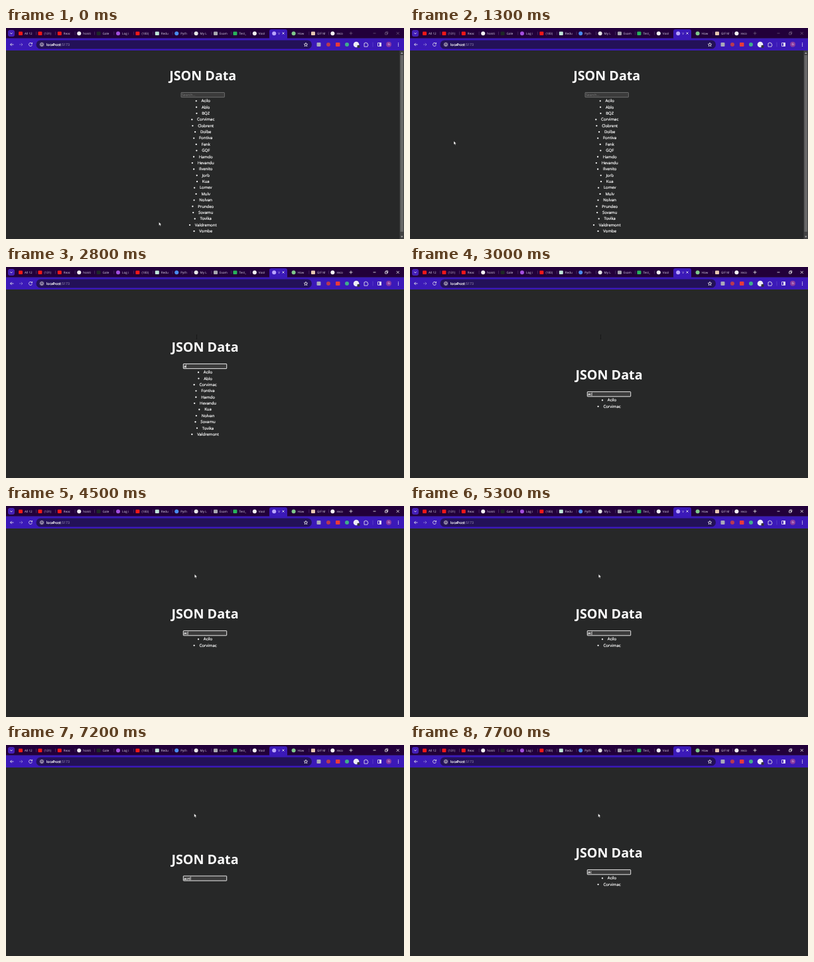
An HTML page that plays this animation: 600 px wide and 319 px high, repeating every 8000 ms.

```html
<!DOCTYPE html>
<html lang="en">
<head>
<meta charset="utf-8">
<title>JSON Data</title>
<style>
html, body { margin: 0; width: 100%; height: 100%; overflow: hidden; background: #272828; }
svg { display: block; width: 600px; height: 319px; font-family: "Open Sans", "Noto Sans", sans-serif; fill: #fff; text-rendering: geometricPrecision; }
.line { fill: none; stroke: #eee; stroke-width: .8; }
.tab { font-size: 4.6px; fill: #ddd6ea; }
.item { font-size: 6px; text-anchor: middle; }
.field { font-size: 5.3px; }
.strong { stroke: #fff; stroke-width: .18; }
</style>
</head>
<body>
<svg viewBox="0 0 600 319">
  <rect width="600" height="319" fill="#272828"/>
  <g id="chrome"></g>
  <g id="page"></g>
  <g id="mouse"></g>
</svg>
<script>
const LOOP = 8000, ROW = 9.375;
const brands = ('Acilo Ablo BQZ Corvimac Clobrent Dolbe Fontiva Fenk GQF Hamdo Hevandu ' +
  'Ilvenito Jorb Kua Lomev Mulv Nolvan Prundeo Sovamu Tovika Valdremont Vombe').split(' ');
const el = id => document.getElementById(id);
const [chrome, page, mouse] = ['chrome', 'page', 'mouse'].map(el);

const rect = (x, y, w, h, fill, r = 0, more = '') =>
  `<rect x="${x}" y="${y}" width="${w}" height="${h}" rx="${r}" fill="${fill}" ${more}/>`;
const dot = (x, y, r, fill) => `<circle cx="${x}" cy="${y}" r="${r}" fill="${fill}"/>`;
const ring = (x, y, r) => `<circle class="line" cx="${x}" cy="${y}" r="${r}"/>`;
const path = (d, more = '') => `<path class="line" d="${d}" ${more}/>`;
const text = (x, y, s, more = '') => `<text x="${x}" y="${y}" ${more}>${s}</text>`;

// Tab icons: shape (s = square, c = circle), colour, label
const tabs = [
  ['s', '#f01818', 'All 12'], ['s', '#f01818', '(131)'], ['s', '#f01818', 'Reac'],
  ['c', '#f4f4f4', 'hoisti'], ['s', '#1d2a26', 'Gale'], ['c', '#a44fe0', 'Log i'],
  ['s', '#f01818', '(183)'], ['s', '#bfe8d8', 'Redu'], ['c', '#4a8cf0', 'Pyth'],
  ['c', '#e8e8e8', 'My L'], ['s', '#a8a8b0', 'Exam'], ['s', '#28b45a', 'Test_'],
  ['c', '#f4f4f4', 'Vool'], ['c', '#b9a4ff', 'V'], ['c', '#7fc98a', 'How'],
  ['s', '#e8c8b0', 'GIF M'], ['c', '#f4f4f4', 'reco']
];

function drawChrome() {
  let out = rect(0, 0, 600, 15.5, '#22003a') + rect(0, 15.5, 600, 18.5, '#3b19b8')
    + rect(397, 2, 27, 16, '#3b19b8', 3)
    + rect(3, 3, 10, 10, '#4520b8', 3) + path('M6.3 7.3l1.7 1.7l1.7-1.7');
  tabs.forEach(([shape, color, label], i) => {
    const x = 22 + i * 29.4;
    out += shape === 's' ? rect(x - 3, 5.5, 6, 5.5, color, 1) : dot(x, 8.2, 3, color);
    out += text(x + 6, 9.9, label, 'class="tab"');
    if (i < 16 && i !== 12 && i !== 13) out += rect(x + 23, 5.5, .5, 5, '#6a4a86');
  });
  out += path('M416.5 6.5l3 3m0-3l-3 3')
    + path('M517.5 8h5M520 5.5v5M553.5 8h4M571.5 7h3v3h-3zM572.7 7v-1.2h3v3h-1.2M588.7 6l4 4m0-4l-4 4', 'id="controls"')
    + path('M11.5 25h-5m2.2-2.2l-2.2 2.2l2.2 2.2')
    + path('M20 25h5m-2.2-2.2l2.2 2.2l-2.2 2.2', 'opacity=".45"')
    + path('M39 23.5a2.5 2.5 0 1 0 .4 2M39.5 22v2h-2')
    + rect(45.5, 18.4, 415.5, 13.2, '#231158', 6.6)
    + dot(54, 25, 4, '#3a2864') + ring(54, 25, 2.3) + rect(53.6, 24.6, .8, 1.8, '#fff')
    + text(61, 26.8, 'localhost<tspan fill="#aaa0c0" stroke="none">:5173</tspan>', 'class="strong" style="font-size:5.2px"')
    + path('M452 22.3l.8 1.9l2 .1l-1.5 1.4l.5 2l-1.8-1.1l-1.8 1.1l.5-2l-1.5-1.4l2-.1z')
    + rect(468.5, 22, 6, 6, '#a9a9b8', 1) + dot(486, 25, 3, '#b83a50')
    + rect(497, 22, 6.5, 6, '#e83a3a', 1) + dot(514, 25, 3, '#3fae8c')
    + dot(528, 25, 4.3, '#ececf4') + rect(529.5, 26, 4, 4, '#33333d', 1)
    + path('M540 23h1.5a1 1 0 0 1 2 0h1.5v1.8a1 1 0 0 1 0 2v1.4h-5z')
    + rect(552.7, 21.5, .6, 7, '#6b55cc')
    + path('M560.5 22.5h5v5h-5z') + rect(563, 22.5, 2.5, 5, '#fff')
    + dot(577, 24.8, 4, '#8a3aa0') + text(577, 26.4, 'G', 'style="font-size:4.4px" text-anchor="middle"')
    + [22.8, 25, 27.2].map(y => dot(591.5, y, .65, '#fff')).join('');
  chrome.innerHTML = out;
}

// time, query, caret shown, window focused
const states = [
  [0, '', 0, 0], [2600, '', 1, 1], [2700, 'a', 1, 1], [2900, 'ac', 1, 1],
  [4700, 'ac', 0, 1], [5300, 'ac', 1, 1], [5800, 'acr', 1, 1], [6100, 'acrt', 1, 1],
  [6700, 'acrt', 0, 1], [7200, 'acrt', 1, 1], [7400, 'acr', 1, 1], [7600, 'ac', 1, 1], [7700, 'ac', 0, 1]
];

function drawPage([, query, caret, focus]) {
  const list = brands.filter(b => b.toLowerCase().includes(query));
  const full = list.length === brands.length;
  const cx = full ? 296.7 : 300;
  const y = Math.max(72, 172.5 - list.length * ROW / 2);
  let out = text(cx, y + 7.2, 'JSON Data', 'text-anchor="middle" style="font-size:19.7px;font-weight:700"')
    + rect(cx - 32.7, y + 25.5, 65.4, 7.2, '#3b3b3b', .6,
      `stroke="${focus ? '#fff' : '#858585'}" stroke-width="${focus ? .9 : .7}"`)
    + text(cx - 31.8, y + 31, query || 'Search...',
      query ? 'class="field strong"' : 'class="field" fill="#7c7c7c"');
  list.forEach((name, i) => out += text(cx + 4.5, y + 40.2 + i * ROW, name, 'class="item strong"'));
  if (full) out += rect(593.5, 34, 6.5, 285, '#424242') + rect(594.5, 41, 4.5, 267, '#686868')
    + '<path d="M595 39l1.8-2.4l1.8 2.4zM595 314.5l1.8 2.4l1.8-2.4z" fill="#aaa"/>';
  page.innerHTML = out;
  el('controls').style.opacity = focus ? 1 : .35;

  // Bullets and caret depend on the rendered text widths
  let marks = '';
  page.querySelectorAll('.item').forEach((t, i) =>
    marks += dot(cx - 3.3 - t.getComputedTextLength() / 2, y + 38.3 + i * ROW, 1.15, '#fff'));
  if (caret) {
    const width = query ? page.querySelector('.field').getComputedTextLength() : 0;
    marks += rect(cx - 31.6 + width, y + 26.4, .6, 5.2, '#fff');
  }
  page.insertAdjacentHTML('beforeend', marks);
}

// time, x, y of the pointer tip
const route = [
  [0, 230.5, 293.5], [800, 230.5, 293.5], [1300, 66, 171], [1500, 62.5, 160], [1700, 67, 156.5],
  [2100, 238.3, 119], [2600, 284.3, 103.3], [6200, 284.3, 103.3], [6300, 283.7, 103.8], [LOOP, 283.7, 103.8]
];

function pointer(t) {
  const i = route.findIndex(p => p[0] > t);
  const [t0, x0, y0] = route[i - 1], [t1, x1, y1] = route[i];
  const u = (t - t0) / (t1 - t0), k = u * u * (3 - 2 * u);
  return [x0 + (x1 - x0) * k, y0 + (y1 - y0) * k];
}

function drawMouse(t) {
  const [x, y] = pointer(t);
  const beam = t >= 2500 && t < 4500;
  mouse.innerHTML = beam
    ? '<path d="M286.8 102.8h1.4M287.5 102.8v6M286.8 108.8h1.4" stroke="#0c0c0c" stroke-width=".5" fill="none"/>'
    : `<path transform="translate(${x} ${y})" d="M0 0v5.2l1.2-1.1l.9 1.9l.9-.4l-.9-1.9h1.7z"
        fill="#fff" stroke="#111" stroke-width=".3"/>`;
}

let shown, tick;
function frame() {
  const t = Math.floor(performance.now() % LOOP / 100) * 100;
  if (t !== tick) {
    const state = states.filter(s => s[0] <= t).pop();
    if (state !== shown) drawPage(shown = state);
    drawMouse(tick = t);
  }
  requestAnimationFrame(frame);
}
drawChrome();
frame();
</script>
</body>
</html>
```
